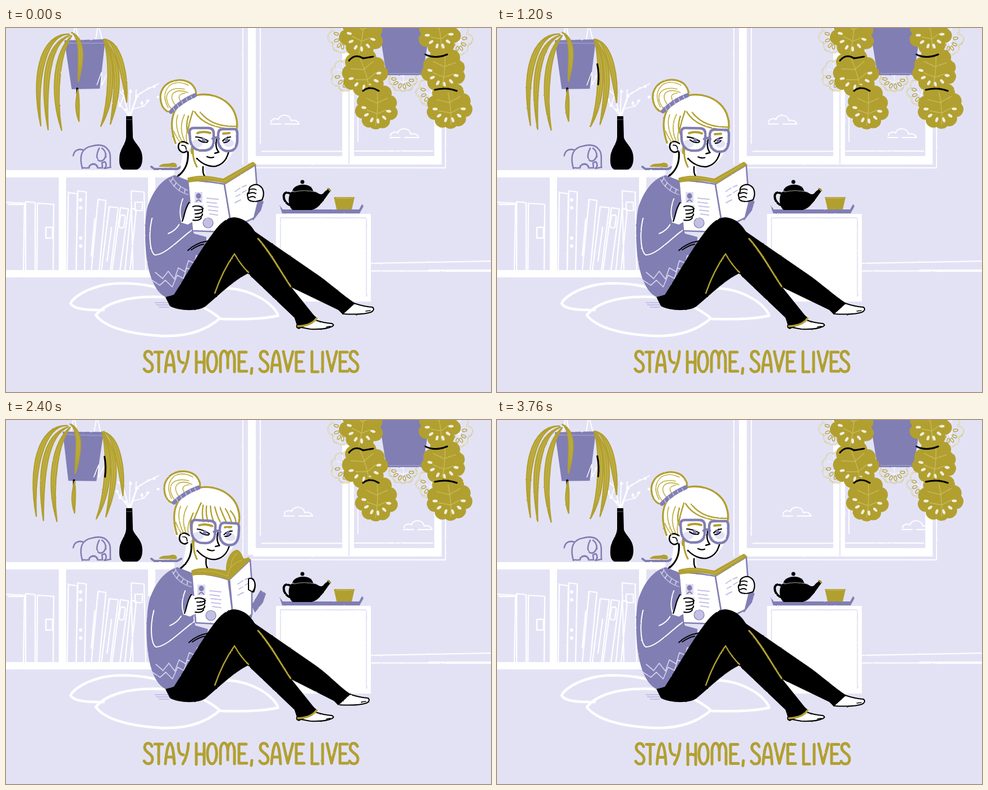
Write an HTML page that moves like this. It is 864 by 648 pixels and loops after 3.84 s.

```html
<!DOCTYPE html>
<html lang="en">
<head>
<meta charset="utf-8">
<title>Stay home, save lives</title>
<style>
html, body { margin: 0; width: 100%; height: 100%; overflow: hidden; background: #e3e2f5; }
svg { display: block; width: 864px; height: 648px; stroke-linecap: round; stroke-linejoin: round; }
</style>
</head>
<body>
<svg id="stage" viewBox="0 0 864 648" xmlns="http://www.w3.org/2000/svg"></svg>
<script>
const BG = '#e3e2f5', PURPLE = '#817eb3', OLIVE = '#b1a030', GOLD = '#c1b045';
const WHITE = '#fff', BLACK = '#000', PALE = '#c3c0e4';
const FRAME = 80, COUNT = 48;

const fill = (d, c) => `<path d="${d}" fill="${c}"/>`;
const line = (d, c, w = 2.5) => `<path d="${d}" fill="none" stroke="${c}" stroke-width="${w}"/>`;
const shape = (d, f, c, w) => `<path d="${d}" fill="${f}" stroke="${c}" stroke-width="${w}"/>`;
const rect = (x, y, w, h, c) => `<rect x="${x}" y="${y}" width="${w}" height="${h}" fill="${c}"/>`;
const oval = (x, y, rx, ry, f, c = 'none', w = 0) =>
  `<ellipse cx="${x}" cy="${y}" rx="${rx}" ry="${ry}" fill="${f}" stroke="${c}" stroke-width="${w}"/>`;
const group = (id, body) => `<g id="${id}">${body}</g>`;

// ---------- room ----------
const cloud = (x, y) => line(
  `M${x + 26} ${y}H${x + 51}C${x + 50} ${y - 5} ${x + 44} ${y - 8} ${x + 37} ${y - 6}` +
  `C${x + 35} ${y - 19} ${x + 16} ${y - 18} ${x + 14} ${y - 8}C${x + 8} ${y - 12} ${x + 1} ${y - 8} ${x + 1} ${y - 3}M${x} ${y}H${x + 18}`, WHITE, 2);

const windowFrame =
  line('M422 0V243M427 248.5L783 249V165M627 112V202M456 219.5H600M622 219H760M453 0V205', WHITE, 1.8) +
  rect(431, 0, 14, 240, WHITE) + rect(440, 228, 336, 15, WHITE) +
  rect(599, 0, 21, 242, WHITE) + rect(763, 0, 13, 242, WHITE) +
  line('M611 60V241', BG, 2);

const book = (x, top, w, lean = 0, low = 431) =>
  line(`M${x} ${low}L${x + lean} ${top}L${x + w + lean} ${top + 2}L${x + w} ${low}`, WHITE, 2.2);

const shelf =
  rect(0, 253, 300, 13, WHITE) + rect(94, 260, 13, 176, WHITE) +
  rect(253, 264, 13, 50, WHITE) + rect(0, 431, 262, 13, WHITE) +
  book(-5, 310, 36, 2) + book(35, 309, 17) + book(55, 312, 29, 1) +
  line('M71 355h12v19h-12ZM4 314h26', WHITE, 2.5) +
  book(109, 293, 16, 2) + book(125, 290, 15, 3) +
  book(152, 305, 14, 12) + book(170, 318, 16, 14) + book(189, 320, 14, 15) + book(212, 321, 9, 11) +
  book(226, 290, 23, -3) +
  line('M230 310h13v15h-13ZM204 334q10-4 8 6l-2 15q-8 3-9-4ZM158 340l-6 66M188 355l-8 60', WHITE, 2.2) +
  [306, 320, 374, 388].map(y => oval(133, y, 3, 3, WHITE)).join('');

const elephant = line(
  'M136 250C130 228 134 213 154 210C164 207 176 208 181 216C188 222 185 236 186 248L175 250C180 246 179 241 176 238' +
  'L171 240L172 249H163C163 240 149 239 148 249H137M137 217C128 214 121 219 120 227M166 214C158 230 163 240 172 236C180 230 179 220 171 214M148 246q8-7 15 0', PURPLE, 2.6) +
  oval(178, 229, 1.5, 1.5, PURPLE);

const twigs = line(
  'M219 156L209 119L199 110M219 156L197 128M220 156L221 110M222 156L235 118L272 99M221 154L231 126L232 110' +
  'M226 144L246 139L255 128M238 118L255 106M209 122L203 139M244 140L242 131', WHITE, 1.8) +
  [[198, 127], [209, 112], [222, 113], [234, 121], [252, 130], [271, 123], [203, 138], [242, 134], [213, 146], [264, 104]]
    .map(([x, y]) => oval(x, y, 2.5, 2.5, WHITE)).join('');

const vase = fill('M214 157H225L226 195C229 206 243 212 243 232C243 246 237 252 232 252H209C204 250 201 243 202 231C203 214 213 208 214 194Z', BLACK) +
  line('M215 163h10', '#666', 1);

const plate = line('M259 247L264 251H305L312 247', PURPLE, 4) +
  fill('M272 247C277 239 289 243 295 240C303 239 306 244 304 248Z', OLIVE);

const cushions = line(
  'M300 474C260 452 195 451 165 460C143 466 121 478 115 490C121 502 148 502 174 502' +
  'M160 511C180 486 226 476 282 479C326 483 361 499 381 517C352 542 311 552 262 547C211 543 174 530 160 511Z' +
  'M383 518C418 519 461 518 485 512C475 488 435 464 388 463', WHITE, 4.5) +
  line('M266 489h25M268 493h28M273 497h17', PALE, 2);

const table =
  rect(481, 331, 169, 156, WHITE) +
  line('M489 339V470M489 338H641M642 340V478', BG, 1.8) +
  fill('M487 315L493 323H629L634 314L637 317L630 330H492Z', PURPLE) +
  fill('M508 292C516 288 545 287 554 293C560 297 564 297 567 292L575 285L579 289C571 299 566 308 560 314C555 320 549 323 544 324H511C503 319 501 300 508 292Z', BLACK) +
  fill('M510 290C513 276 544 274 547 290Z', BLACK) + oval(528, 274, 3.5, 3.5, BLACK) +
  line('M507 295C491 286 491 309 505 315', BLACK, 4) + line('M512 292Q530 287 553 292', '#aaa', 1) +
  line('M573 286l5 4', OLIVE, 2.5) +
  fill('M584 301H621L616 323H589Z', OLIVE) + line('M588 303h29', GOLD, 2);

const skirting = line('M651 419L756 417L864 415M651 432.5H754', WHITE, 2) + line('M754 432H864', WHITE, 4);

// ---------- plants ----------
const blade = (x0, y0, ax, ay, bx, by, x1, y1, w = 6) =>
  shape(`M${x0} ${y0}C${ax + w} ${ay} ${bx + w} ${by} ${x1} ${y1}C${bx - w} ${by} ${ax - w} ${ay} ${x0} ${y0}Z`, GOLD, OLIVE, 2.4) +
  line(`M${x0} ${y0}C${ax} ${ay} ${bx} ${by} ${x1} ${y1}`, OLIVE, 1.4);

const fern =
  line('M122 0L119 22M125 0L129 19M163 0L160 20M166 0L172 22', WHITE, 1.8) +
  fill('M104 22L177 20L167 108L117 109Z', PURPLE) + line('M107 27H174', '#9895c6', 2) +
  line('M162 101l8-22l1 23l8-19', WHITE, 1.4) +
  blade(112, 11, 66, 10, 49, 88, 62, 174) + blade(114, 13, 72, 28, 66, 100, 75, 181) +
  blade(117, 14, 92, 40, 82, 112, 99, 182) + blade(117, 8, 140, 20, 132, 65, 129, 95, 5) +
  line('M127 108L128 122', BLACK, 4) + blade(128, 110, 128, 130, 126, 145, 130, 166, 4) +
  blade(174, 20, 192, 60, 189, 130, 169, 175) + blade(176, 20, 206, 62, 199, 120, 186, 171) +
  blade(177, 20, 203, 28, 212, 90, 215, 132) +
  `<path id="shade" d="M180 64Q184 82 182 100" fill="none" stroke="#000" stroke-width="3"/>`;

// A hanging leaf: scalloped edge, narrower towards the tip.
function lobed(x, y, rx, ry, turn, solid = true) {
  const n = 9, pts = [];
  for (let i = 0; i < n; i++) {
    const a = -Math.PI / 2 + i * 2 * Math.PI / n, s = Math.sin(a);
    pts.push([rx * .93 * Math.cos(a) * (1 - .24 * s), ry * (.88 * s)].map(v => +v.toFixed(1)));
  }
  const r = (rx + ry) * .175;
  const d = `M${pts[0]}` + pts.slice(1).concat([pts[0]]).map(p => `A${r} ${r} 0 0 1 ${p}`).join('') + 'Z';
  const vein = `M0 ${-ry * .8}Q${rx * .1} 0 0 ${ry * .75}M0 ${-ry * .3}L${rx * .55} ${-ry * .55}M0 ${-ry * .3}L${-rx * .55} ${-ry * .5}` +
    `M2 ${ry * .2}L${rx * .5} 0M2 ${ry * .2}L${-rx * .5} ${ry * .05}`;
  let s = shape(d, solid ? OLIVE : BG, OLIVE, 1.8) + (solid ? line(vein, '#c8ba58', 1.4) : line(d + vein, WHITE, 1));
  for (let i = 0; i < 6; i++) {
    const a = .1 + i * Math.PI / 5, sy = Math.sin(a);
    const px = rx * .66 * Math.cos(a) * (1 - .2 * sy), py = ry * .55 * sy;
    s += `<g transform="translate(${px.toFixed(1)} ${py.toFixed(1)}) rotate(${(a * 180 / Math.PI).toFixed(0)})">` +
      (solid ? oval(0, 0, 4.6, 2.4, '#f2efe0') : oval(0, 0, 4.2, 2.3, 'none', OLIVE, 1.2)) + '</g>';
  }
  return `<g transform="translate(${x} ${y}) rotate(${turn})">${s}</g>`;
}

const monstera =
  lobed(601, 15, 20, 34, 12, false) + lobed(604, 86, 20, 30, -12, false) + lobed(707, 92, 24, 22, 0, false) +
  lobed(756, 114, 20, 28, 12, false) + lobed(804, 20, 20, 32, -15, false) +
  fill('M664 -2H756L742 84H678Z', PURPLE) + line('M683 81H739', '#9c99ca', 1.5) +
  lobed(633, 15, 33, 41, 8) + lobed(772, 12, 32, 39, -8) +
  lobed(640, 85, 38, 38, -16) + lobed(779, 80, 36, 37, 6) +
  lobed(660, 145, 34, 38, 3) + lobed(790, 144, 38, 37, -5) +
  line('M611 58Q622 45 636 54L654 51M636 112Q648 102 664 112M747 47Q764 56 786 47M764 110Q785 105 803 112', BLACK, 3);

// ---------- figure ----------
const sweater =
  fill('M300 262C276 269 259 294 251 323C246 350 248 386 250 405C254 438 264 470 286 480C308 478 330 450 356 403L357 372L335 366L329 350L330 300L326 272Z', PURPLE) +
  line('M296 264Q303 281 326 290M291 270Q304 292 326 297', '#b4b1d8', 2) +
  line('M297 268l-4 6M303 276l-4 6M311 283l-3 6M319 287l-1 6', '#d8d6ee', 1.6) +
  line('M260 339C253 370 257 399 265 404C286 405 322 362 340 354M289 366Q302 361 309 349M315 304Q306 328 314 346', WHITE, 2) +
  line('M266 435l13 11l10-13l11 14l7-20l12 7l6-20l11 5l3-14l12 5M260 449l14 9l10-9l12 12l9-21l11 6l6-19l12 6l5-16l9 2', '#d3d1ec', 1.7) +
  line('M324 396Q337 383 360 379M330 395Q343 386 352 385', BLACK, 2) +
  fill('M449 303L459 309L454 325L440 343L434 330Z', PURPLE);

const details =
  rect(336, 292, 14, 19, '#dddbf0') + oval(343, 299, 4.5, 5, PURPLE) + line('M339 309q4-6 8 0', PURPLE, 2) +
  line('M358 303l20 2M358 310l17 2M360 317l18 2M361 324l16 2M363 331l14 2M338 316l13 1', PALE, 2) +
  oval(360, 347, 9, 9, PALE, PURPLE, 1.2) +
  line('M408 291l9-6M421 283l7-3M410 300l7-4M421 293l7-4M408 311l10-5', PALE, 2);

const leftHand =
  fill('M318 330L326 312L346 316L352 322L349 344L330 346L321 353L311 347Z', WHITE) +
  line('M326 311C318 323 319 332 314 344M333 318C341 315 350 318 351 322Q343 325 336 324M350 324Q352 330 337 331M350 331Q350 338 337 337M348 338Q344 344 333 342', BLACK, 2.2) +
  fill('M308 345L324 350L331 346L328 362L310 356Z', PURPLE);

const rightHand = (x) =>
  `<g transform="translate(${x} 0)">` +
  shape('M433 287C434 280 446 276 452 281C459 285 461 296 456 306L445 309Q430 309 431 301Q428 295 433 292Z', WHITE, BLACK, 2.2) +
  line('M433 288Q441 285 446 288M432 295Q440 291 445 295M433 302Q440 298 444 302', BLACK, 1.8) + '</g>';

const bookOpen =
  shape('M324 272C345 270 369 275 389 278L400 344L385 363L332 361Z', WHITE, PURPLE, 2.6) +
  shape('M389 278L444 244L449 310L442 338L413 352L400 344Z', WHITE, PURPLE, 2.6) +
  fill('M323 267C344 259 370 265 387 268L440 238L446 243L391 277C366 270 346 272 325 275Z', OLIVE) +
  line('M335 267Q365 264 388 273L438 243', GOLD, 1.6) +
  details + rightHand(0);

const bookTurn =
  fill('M431 318L440 326L438 352L426 356Z', PURPLE) + rightHand(-15) +
  shape('M331 275C352 272 377 278 396 284L404 346L390 364L338 361Z', WHITE, PURPLE, 2.6) +
  shape('M398 284L435 249L438 290L438 346L425 356L404 348Z', WHITE, PURPLE, 2.6) +
  fill('M330 268C350 259 375 266 392 268C391 249 401 231 412 231C419 233 420 242 424 247L433 244L435 249L398 285C374 277 352 274 331 277Z', OLIVE) +
  line('M342 269Q372 267 395 278Q398 256 420 250M400 264Q402 244 412 237', GOLD, 1.6) +
  `<g transform="translate(5 1)">${details}</g>` +
  shape('M432 283Q439 279 443 289Q445 299 439 306L432 302Z', WHITE, BLACK, 2);

const neck = fill('M316 215L309 262Q312 273 328 281L356 268L354 235Z', WHITE) +
  line('M324 221C326 244 316 256 306 264', BLACK, 3.2) + line('M351 247Q350 259 354 264', BLACK, 2.5);

const face =
  fill('M300 207C285 160 303 122 352 117C394 118 417 151 412 184L407 211C401 232 388 247 373 246C354 247 337 231 330 213L318 222Z', WHITE) +
  shape('M324 206C315 199 307 203 307 211C307 219 316 225 322 219', WHITE, BLACK, 2.6) +
  line('M313 209Q321 208 321 216', BLACK, 1.8) +
  line('M340 232C348 241 361 248 374 246C389 242 394 231 397 219', BLACK, 2.4) +
  line('M335 205Q329 227 340 247M332 207Q330 215 331 223', OLIVE, 3) +
  oval(340, 206, 10, 7, BG) + oval(397, 205, 9, 7, BG) +
  line('M376 194Q371 211 379 221L372 223', BLACK, 2.5) +
  line('M358 229Q364 232 370 230', BLACK, 2.2) +
  line('M338 194Q348 194 360 201M343 199Q351 205 359 203M386 201Q391 195 400 194M388 204Q395 204 398 199', BLACK, 2.2) +
  oval(352, 199, 3.2, 3.6, PURPLE) + oval(393, 199, 3.2, 3.6, PURPLE) +
  line('M341 187Q352 183 364 187M387 188L398 187', OLIVE, 4);

const bun =
  shape('M292 150C276 147 270 121 280 107C291 89 324 88 334 104Q340 112 338 119', WHITE, OLIVE, 3.2) +
  line('M295 145C275 120 291 103 318 109M303 139C284 117 304 106 324 115M289 142Q275 117 293 101Q308 93 325 102M312 132Q302 118 319 116', GOLD, 1.6);

const band = line('M294 149Q312 130 336 120', PURPLE, 7.5) +
  line('M298 142l3 6M305 136l3 6M313 130l3 6M321 125l3 6M329 121l3 5', '#d5d3ea', 1.2);

const hairline = line('M302 205C288 165 298 140 322 127C350 108 399 121 409 156Q413 168 411 180', OLIVE, 3.4) +
  line('M299 184Q304 196 311 204M306 155Q299 174 313 201M318 154Q307 177 318 201M326 174Q319 187 322 202', GOLD, 1.8);

const sideFringe = line(
  'M333 148Q327 166 324 182M336 149C348 168 368 178 411 181M346 150C362 170 384 176 411 175M325 157Q318 179 327 191', OLIVE, 2.4);
const bangs = line(
  'M342 147Q335 165 328 187M346 151Q344 167 348 180M352 152Q351 169 357 180M359 152Q361 169 367 180M367 153Q371 167 378 179M376 153Q383 168 389 179M386 155Q394 167 398 178M395 158Q405 168 406 178M329 166Q323 180 326 195', OLIVE, 2.4);

const glasses = line(
  'M327 185Q327 178 335 178H360Q370 178 370 188V202Q369 217 354 218H345Q330 215 328 199Z' +
  'M378 190Q378 180 386 180H405Q412 179 412 188V202Q410 219 397 219H392Q380 216 378 202Z', PURPLE, 4.4) +
  line('M368 197Q374 193 379 197', PURPLE, 4.5);

const nearLeg =
  fill('M299 475C324 436 347 393 371 362C385 343 399 334 413 338C431 342 440 355 450 374L508 461L549 512L520 535L514 516L431 437C405 450 382 473 356 495C344 505 307 504 292 495L284 479Z', BLACK) +
  line('M372 472Q386 432 407 402Q419 423 432 435', OLIVE, 2.4) +
  shape('M526 533L551 520Q566 525 580 526Q587 529 579 532Q569 537 542 536Z', WHITE, BLACK, 2) +
  line('M571 532l7-1M566 535l6-1', BLACK, 1.5) +
  fill('M514 516L548 511L555 517L522 536Q514 534 518 527Z', BLACK) +
  line('M520 531Q544 530 553 517', OLIVE, 3.5) +
  line('M449 375C470 398 487 430 507 460', OLIVE, 3);

function farLeg(k) {
  const x = -8 * k, y = -2 * k;
  return shape(`M${600 + x} ${505 + y}L${620 + x} ${490 + y}Q${638 + x} ${496 + y} ${653 + x} ${497 + y}Q${658 + x} ${502 + y} ${650 + x} ${506 + y}Q${635 + x} ${511 + y} ${600 + x} ${509 + y}Z`, WHITE, BLACK, 2) +
    line(`M${641 + x} ${504 + y}l8-1`, BLACK, 1.5) +
    fill(`M440 360L546 433C575 452 ${600 + x} ${476 + y} ${622 + x} ${490 + y}L${600 + x} ${510 + y}L${592 + x} ${502 + y}L507 461L446 375Z`, BLACK);
}

// ---------- lettering ----------
const S = x => `M${x + 13} 581c-3-8-12-7-13 1c-1 10 14 11 14 21c0 11-11 11-15 4`;
const A = x => `M${x} 612C${x + 4} 563 ${x + 13} 563 ${x + 16} 612M${x + 3} 600h10`;
const V = x => `M${x} 576l8 35l9-35`;
const E = x => `M${x + 14} 577h-13v34h14M${x + 1} 594h10`;
const letters = [
  S(247), 'M265 577h14M272 577v35', A(284), 'M307 576c0 15 3 20 9 20M325 576q-1 21-10 36',
  'M339 576v37M353 576v37M339 595h14', 'M367 576c-11 0-11 36 0 36c11 0 11-36 0-36',
  'M382 612V590C382 570 395 570 395 590V605M395 590C395 570 407 571 407 590V612', E(414), 'M438 606l-1 9',
  S(453), A(473), V(494), E(516), 'M545 576v36h11', 'M564 577v35', V(572), E(594), S(613)
];

document.getElementById('stage').innerHTML = `
<defs><filter id="rough" filterUnits="userSpaceOnUse" x="0" y="0" width="864" height="648" color-interpolation-filters="sRGB">
<feTurbulence type="fractalNoise" baseFrequency=".22" numOctaves="2" seed="4"/>
<feDisplacementMap in="SourceGraphic" scale="1.8" xChannelSelector="R" yChannelSelector="G"/></filter></defs>
${rect(0, 0, 864, 648, BG)}
<g filter="url(#rough)">
${group('clouds', cloud(471, 171) + cloud(684, 195))}
${windowFrame + skirting + shelf + elephant + twigs + vase + plate + cushions + table}
${group('fern', fern)}${monstera}
${group('farLeg', '')}
${group('torso', neck + sweater)}
${group('head', bun + face + hairline + group('side', sideFringe) + group('bangs', bangs) + band + glasses)}
${group('open', bookOpen)}${group('turn', bookTurn)}
${group('hand', leftHand)}
${nearLeg}
<g id="words" role="img" aria-label="STAY HOME, SAVE LIVES">${line(letters.join(''), OLIVE, 5)}</g>
</g>`;

const el = id => document.getElementById(id);
const move = (id, t) => el(id).setAttribute('transform', t);
const show = (id, on) => el(id).setAttribute('visibility', on ? 'visible' : 'hidden');

// Four drawings of the figure and fern, each held for three steps.
const poses = [
  { sway: 0, tilt: 0, turn: 0 },
  { sway: .3, tilt: .35, turn: 0 },
  { sway: 1, tilt: 1, turn: 1 },
  { sway: .3, tilt: 0, turn: 0 }
];

function draw(step) {
  const { sway, tilt, turn } = poses[Math.floor(step / 3) % 4];
  move('clouds', `translate(${step * .8} 0)`);
  move('fern', `rotate(${1.9 * sway} 140 -70)`);
  show('shade', sway > 0);
  move('head', `rotate(${3.2 * tilt} 335 245)`);
  const lean = -.024 * turn;
  move('torso', `matrix(1 0 ${lean} 1 ${-480 * lean} 0)`);
  move('hand', `translate(${4 * turn} 0)`);
  show('side', !turn);
  show('bangs', turn);
  show('open', !turn);
  show('turn', turn);
  el('farLeg').innerHTML = farLeg(turn);
  const beat = step % 5;
  move('words', beat === 2 || beat === 3 ? 'translate(1 .4)' : '');
}

let last = -1;
function tick() {
  const step = Math.floor(performance.now() / FRAME) % COUNT;
  if (step !== last) draw(last = step);
  requestAnimationFrame(tick);
}
tick();
</script>
</body>
</html>
```
